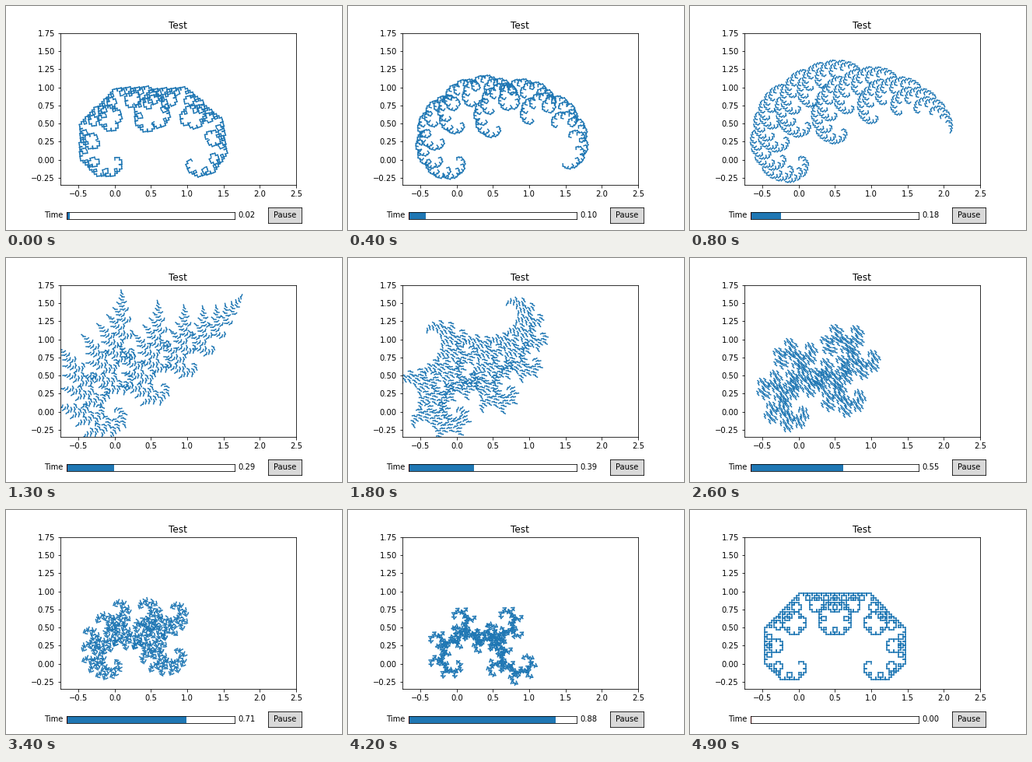
Write a matplotlib script that moves like this. It is 432 by 288 pixels and loops after 5000 ms.

```python
import numpy as np
import matplotlib.pyplot as plt
from matplotlib.animation import FuncAnimation
from matplotlib.collections import LineCollection
from matplotlib.patches import Rectangle

FRAMES = 50
INTERVAL = 100
DEPTH = 10

plt.rcParams["font.family"] = "DejaVu Sans"
plt.rcParams["font.size"] = 10


def fractal(t):
    """Segments of a two-map IFS turning from the Levy curve into the dragon."""
    first = (1 + 1j) / 2
    second = np.exp(1j * np.pi * (t - 0.25)) / np.sqrt(2)
    shift = (1 - t) * (1 + 1j) / 2 + t
    z = np.array([[0, 1]], dtype=complex)
    for _ in range(DEPTH):
        z = np.concatenate([first * z, shift + second * z])
    return np.stack([z.real, z.imag], axis=-1)


def bare_axes(rect, color):
    ax = fig.add_axes(rect, facecolor=color)
    ax.set(xlim=(0, 1), ylim=(0, 1), xticks=[], yticks=[])
    return ax


fig = plt.figure(figsize=(6, 4), dpi=72, facecolor="white")

ax = fig.add_axes([0.125, 0.2, 0.775, 0.68])
ax.set(xlim=(-0.75, 2.5), ylim=(-0.35, 1.75), aspect="equal", title="Test")
curve = LineCollection([], colors="C0", linewidths=1.5, capstyle="projecting")
ax.add_collection(curve, autolim=False)

slider = bare_axes([0.18, 0.05, 0.5, 0.03], "white")
bar = slider.add_patch(Rectangle((0, 0), 0, 1, facecolor="C0", linewidth=0))
slider.axvline(0, color="r", linewidth=1)
slider.text(-0.02, 0.5, "Time", ha="right", va="center")
value = slider.text(1.02, 0.5, "", ha="left", va="center")

button = bare_axes([0.78, 0.03, 0.1, 0.07], "0.85")
button.text(0.5, 0.5, "Pause", ha="center", va="center")


def update(frame):
    t = (frame + 1) % FRAMES / (FRAMES - 1)
    curve.set_segments(fractal(t))
    bar.set_width(t)
    value.set_text(f"{t:.2f}")
    return curve, bar, value


anim = FuncAnimation(fig, update, frames=FRAMES, interval=INTERVAL,
                     init_func=lambda: update(0), repeat=True, repeat_delay=0)
plt.show()
```
